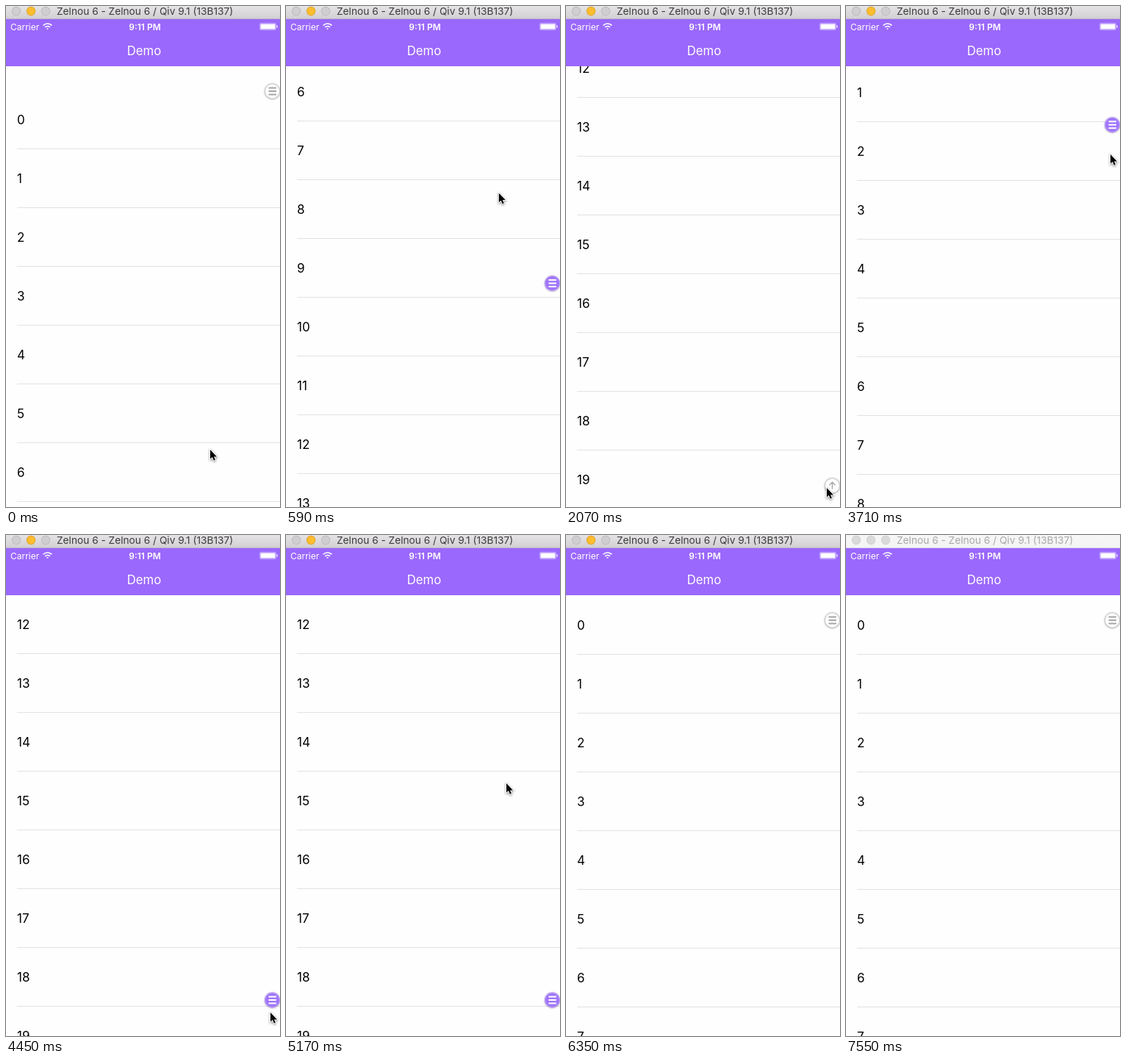
These frames come from a looping animation (373x682 px, 7590 ms). An HTML page with a canvas:

```html
<!DOCTYPE html>
<html lang="en">
<head>
<meta charset="utf-8">
<title>Demo</title>
<style>
  html, body { margin: 0; width: 100%; height: 100%; overflow: hidden; background: #fefefe; }
  canvas { display: block; }
</style>
</head>
<body>
<canvas id="stage" width="373" height="682"></canvas>
<script>
const ctx = document.getElementById('stage').getContext('2d');
const LOOP = 7590, STEP = 147.6, INACTIVE_AT = 7550;
const PURPLE = '#9a68fc', ROWS = 20, ROW = 80, MAX_SCROLL = 998;

const clamp = (v, lo, hi) => Math.min(hi, Math.max(lo, v));

// Eased move towards a new position between two steps.
function glide(pos, step, from, to, ...target) {
  const u = clamp((step - from) / (to - from), 0, 1);
  const eased = u * u * (3 - 2 * u);
  return pos.map((v, i) => v + (target[i] - v) * eased);
}

function scrollAt(step) {
  let pos = [-32];
  pos = glide(pos, step, 1, 7, MAX_SCROLL + 5);   // fling to the end
  pos = glide(pos, step, 7, 9, MAX_SCROLL);       // bounce back
  pos = glide(pos, step, 14, 15, 0);              // tap on the arrow
  pos = glide(pos, step, 24, 29.45, 961);         // drag of the button
  pos = glide(pos, step, 35, 40, -30);            // pull down past the top
  pos = glide(pos, step, 41, 43, 0);              // bounce back
  return Math.round(pos[0]);
}

function cursorAt(step) {
  let pos = [278, 604];
  pos = glide(pos, step, 1, 5, 292, 190);
  pos = glide(pos, step, 9, 14, 355, 656);
  pos = glide(pos, step, 17, 25, 360, 202);
  pos = glide(pos, step, 25, 30, 360, 650);
  pos = glide(pos, step, 31, 35, 300, 338);
  pos = glide(pos, step, 35, 39, 296, 668);
  return glide(pos, step, 41, 42, 296, 710);
}

function text(str, x, y, size, color, weight = 400, align = 'left') {
  ctx.font = `${weight} ${size}px Inter, sans-serif`;
  ctx.textAlign = align;
  ctx.fillStyle = color;
  ctx.fillText(str, x, y);
}

function rect(x, y, w, h, color) {
  ctx.fillStyle = color;
  ctx.fillRect(x, y, w, h);
}

function disc(x, y, r, color) {
  ctx.beginPath();
  ctx.arc(x, y, r, 0, Math.PI * 2);
  ctx.fillStyle = color;
  ctx.fill();
}

function withShadow(color, blur, dy, draw) {
  ctx.save();
  ctx.shadowColor = color;
  ctx.shadowBlur = blur;
  ctx.shadowOffsetY = dy;
  draw();
  ctx.restore();
}

function drawTitleBar(active) {
  const shade = ctx.createLinearGradient(0, 0, 0, 17);
  shade.addColorStop(0, active ? '#e5e3e5' : '#f6f6f6');
  shade.addColorStop(1, active ? '#d2d0d2' : '#f4f4f4');
  rect(0, 0, 373, 17, shade);
  rect(0, 17, 373, 1, active ? '#b9b0c8' : '#d9d2e6');
  for (let i = 0; i < 3; i++) {
    const lit = active && i === 1, x = 14 + i * 20;
    disc(x, 7, 6.2, lit ? '#e2a32b' : active ? '#bdbbbd' : '#d0d0d0');
    disc(x, 7, 5.2, lit ? '#fdbd2e' : active ? '#d0ced0' : '#dadada');
  }
  text('Zelnou 6 - Zelnou 6 / Qiv 9.1 (13B137)', 69, 12, 13.7, active ? '#3c3c3c' : '#a9a9a9');
}

function drawNavigation() {
  rect(0, 18, 373, 64, PURPLE);
  text('Carrier', 6, 32.5, 12, '#fff');
  text('9:11 PM', 189, 32.5, 12, '#fff', 600, 'center');
  text('Demo', 188, 67, 16.7, '#fff', 400, 'center');

  ctx.strokeStyle = '#fff';
  ctx.lineWidth = 1.7;
  for (const r of [1, 4.5, 8]) {
    ctx.beginPath();
    ctx.arc(56.5, 32, r, -Math.PI * 0.76, -Math.PI * 0.24);
    ctx.stroke();
  }

  ctx.strokeStyle = 'rgba(255,255,255,.6)';
  ctx.lineWidth = 0.7;
  ctx.beginPath();
  ctx.roundRect(345.4, 23.4, 22.2, 9.2, 2);
  ctx.stroke();
  rect(346.5, 24.5, 20, 7, '#fff');
  rect(368.4, 26.5, 1.2, 3, '#fff');
}

function drawList(scroll) {
  for (let n = 0; n < ROWS; n++) {
    const y = 122 + n * ROW - scroll;
    text(n, 15, y + 6.5, 17, '#000');
    rect(15, y + 40, 358, 1, '#e2e2e4');
  }
}

// Grey menu at the top, grey arrow at the bottom, purple menu in between.
function drawButton(scroll) {
  const place = clamp(scroll, 0, MAX_SCROLL);
  const moving = place > 0 && place < MAX_SCROLL;
  const x = 362.5, y = 116 + place * 0.538;
  withShadow('rgba(0,0,0,.3)', 2, 0.5, () => disc(x, y, 10.7, moving ? '#c0a4f6' : '#d0d0d0'));
  disc(x, y, 9.5, moving ? '#a176fa' : '#fefefe');

  if (place === MAX_SCROLL) {
    ctx.strokeStyle = '#a5a5a5';
    ctx.lineWidth = 1.4;
    ctx.stroke(new Path2D(`M${x} ${y + 4.7}v-9.4m-4 4l4 -4l4 4`));
  } else {
    for (const dy of [-4.5, 0, 4.5]) rect(x - 5, y + dy - 1, 10.5, 2, moving ? '#fff' : '#a6a6a6');
  }
}

function drawCursor([x, y]) {
  const arrow = new Path2D('M0 0V12.6L2.9 10L4.9 14.7L6.9 13.8L5 9.4H9Z');
  ctx.save();
  ctx.translate(x, y);
  ctx.lineWidth = 1.8;
  ctx.strokeStyle = '#fff';
  withShadow('rgba(0,0,0,.5)', 3, 1, () => ctx.stroke(arrow));
  ctx.fillStyle = '#000';
  ctx.fill(arrow);
  ctx.restore();
}

function draw(t) {
  const step = Math.floor(t / STEP);
  const scroll = scrollAt(step);
  rect(0, 0, 373, 682, '#fefefe');
  drawList(scroll);
  drawButton(scroll);
  drawNavigation();
  drawTitleBar(t < INACTIVE_AT);
  drawCursor(cursorAt(step));
}

const start = performance.now();
function frame() {
  draw((performance.now() - start) % LOOP);
  requestAnimationFrame(frame);
}
frame();
</script>
</body>
</html>
```
